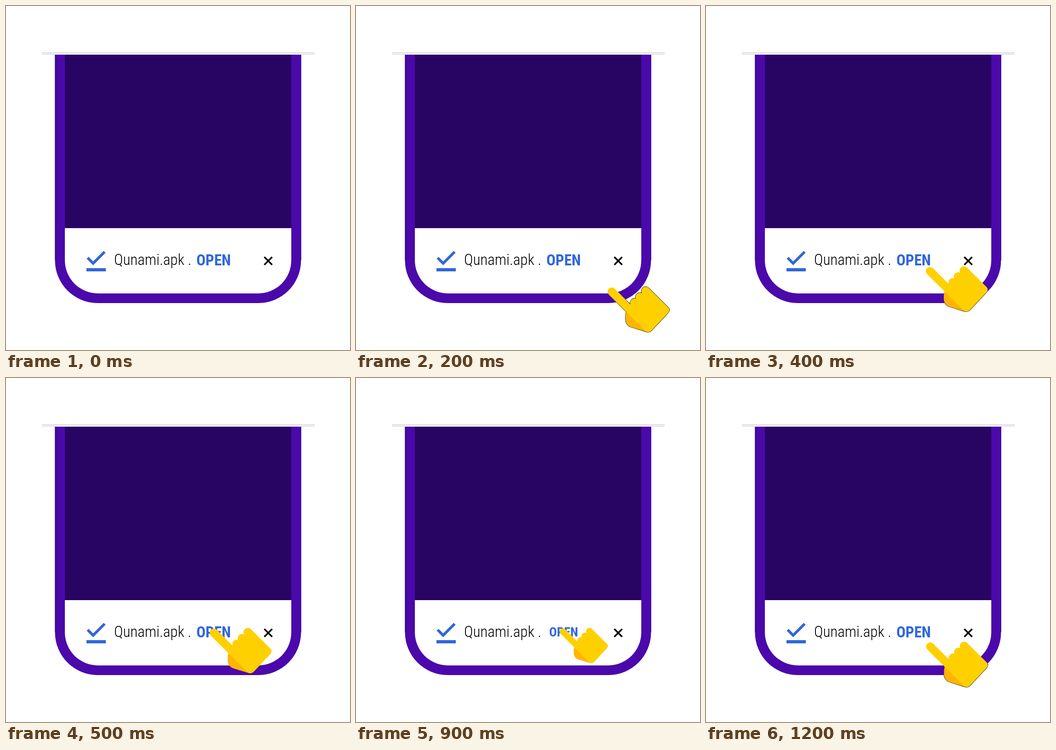
Write an HTML page that moves like this. It is 748 px wide and 748 px high and loops after 1.5 s.

```html
<!DOCTYPE html>
<html lang="en">
<head>
<meta charset="utf-8">
<title>Open the download</title>
<style>
  html, body { margin: 0; width: 100%; height: 100%; overflow: hidden; background: #fff; }
  svg { display: block; width: 100vw; height: 100vh; }
  text { font: 300 33px "Roboto Condensed", Roboto, sans-serif; font-stretch: 75%; }
  #open text { font-weight: 700; fill: #3066db; }
  #ref { font-family: Roboto, sans-serif; font-stretch: 100%; visibility: hidden; }
</style>
</head>
<body>
<svg viewBox="0 0 748 748" xmlns="http://www.w3.org/2000/svg">
  <defs>
    <clipPath id="outside">
      <path clip-rule="evenodd" d="M0 0H748V748H0Z M106.5 105H641.5V553A93 93 0 0 1 548.5 646H199.5A93 93 0 0 1 106.5 553Z"/>
    </clipPath>
    <g id="hand">
      <path id="thumb" fill="#ffb400" d="M41 55Q39 56 39 70Q39 84 52 88.5L82 97.8Q88 99.5 92 98Z"/>
      <path id="palm" fill="#ffd000" d="M2.6 17.4A9 9 0 0 1 15.4 4.6L49.8 39A9.5 9.5 0 0 1 61.5 26.5A9.5 9.5 0 0 1 74.5 14.5A9.5 9.5 0 0 1 89 2.7L131.5 45Q137.5 51 131.5 57.5L95.5 96Q90 101 84 98Z"/>
    </g>
  </defs>

  <!-- phone -->
  <path fill="#4b08ab" d="M106.5 105H641.5V553A93 93 0 0 1 548.5 646H199.5A93 93 0 0 1 106.5 553Z"/>
  <path fill="#430a9c" d="M107 105H112V553H107Z"/>
  <path fill="none" stroke="#33087f" d="M107 105V553M641.5 105V553"/>
  <path fill="#280562" d="M128 105H620.3V483H128Z"/>
  <path fill="#fff" d="M128 483H620.3V553A72 72 0 0 1 548.3 625H200A72 72 0 0 1 128 553Z"/>
  <path fill="#fff" d="M78 101H671V106H78Z"/>
  <path stroke="#c3c2d0" stroke-width="1.2" d="M78 101.8H671M78 105H671"/>

  <!-- download bar -->
  <path fill="none" stroke="#3066db" stroke-width="6" d="M177.5 547.5L189.5 559.5L214.5 534.5"/>
  <path fill="#3066db" d="M175 570H217V577H175Z"/>
  <g transform="translate(235 563)"><text id="file">Qunami.apk .</text></g>
  <text id="ref">Qunami.apk .</text>
  <g id="open"><text y="11.5" text-anchor="middle">OPEN</text></g>
  <path stroke="#000" stroke-width="3.6" d="M561.7 545.7L578.7 562.7M578.7 545.7L561.7 562.7"/>

  <!-- pointer, with a dark rim beyond the phone -->
  <g id="pointer">
    <g clip-path="url(#outside)"><use class="hand" href="#hand" stroke="#000" stroke-width="1.3"/></g>
    <use class="hand" href="#hand"/>
  </g>
</svg>
<script>
  const LOOP = 1500;
  const HOME = [443, 543];
  const TAP = { hand: 0.78, label: 0.84 };

  // start ms, offset from the button, opacity, pressed
  const steps = [
    [0, 104, 67, 0, false],
    [100, 104, 67, 0.5, false],
    [200, 104, 67, 1, false],
    [300, 69.5, 45, 1, false],
    [400, 35, 22.5, 1, false],
    [500, 0, 0, 1, false],
    [700, 0, 0, 1, true],
    [800, 0, 0, 1, false],
    [900, 0, 0, 1, true],
    [1000, 0, 0, 1, false],
    [1100, 18, 15, 1, false],
    [1200, 35.5, 30, 1, false]
  ];

  const byId = id => document.getElementById(id);
  const pointer = byId("pointer");
  const openLabel = byId("open");
  const hands = document.querySelectorAll(".hand");

  // Condense the plain face when no condensed one is available.
  const file = byId("file");
  const ref = byId("ref");
  if (file.getComputedTextLength() > ref.getComputedTextLength() * 0.95) {
    document.querySelectorAll("text").forEach(t => t.setAttribute("transform", "scale(.88 1)"));
  }
  ref.remove();

  function render(time) {
    const [, dx, dy, opacity, pressed] = steps.findLast(s => s[0] <= time);
    const place = `translate(${HOME[0] + dx} ${HOME[1] + dy}) scale(${pressed ? TAP.hand : 1})`;
    hands.forEach(h => h.setAttribute("transform", place));
    pointer.setAttribute("opacity", opacity);
    openLabel.setAttribute("transform", `translate(451.5 552.5) scale(${pressed ? TAP.label : 1})`);
  }

  const start = performance.now();
  function tick() {
    render((performance.now() - start) % LOOP);
    requestAnimationFrame(tick);
  }
  tick();
</script>
</body>
</html>
```
